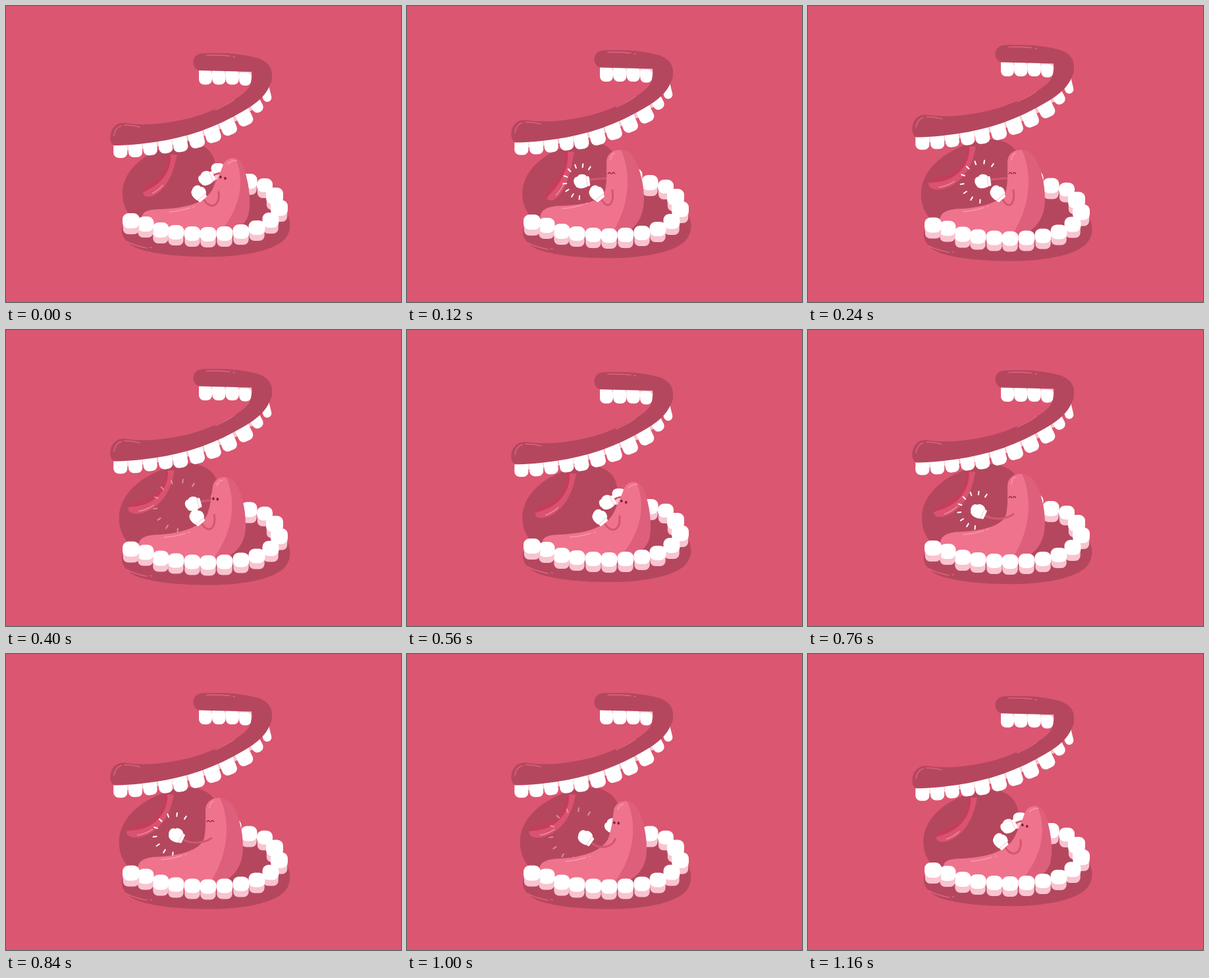
Animation, 600 px wide and 450 px high, one loop 1.2 s. Source, as an HTML page with a canvas:

```html
<!DOCTYPE html>
<html lang="en">
<head>
<meta charset="utf-8">
<title>Boxing tongue</title>
<style>
html, body { margin: 0; width: 100%; height: 100%; overflow: hidden; background: #db5671; }
canvas { display: block; width: 600px; height: 450px; }
</style>
</head>
<body>
<canvas id="stage"></canvas>
<script>
const canvas = document.getElementById('stage');
const g = canvas.getContext('2d');
const ratio = window.devicePixelRatio || 1;
canvas.width = 600 * ratio;
canvas.height = 450 * ratio;

const LOOP = 1200, HALF = 600, STEP = 40;
const BG = '#db5671', GUM = '#b4475e', SHINE = '#dc627d', WHITE = '#ffffff', BLUSH = '#f9c3d0';
const TONGUE = '#ef738d', SHADE = '#de5f7b', GLOW = '#f798ac', ARM = '#d4566f', EYE = '#7c2238';

// Each track is a list of [time, value] keys within half a loop.
const tracks = {
  upper: [[0, 0], [40, 5], [80, 6], [120, -4.5], [160, -10.5], [240, -12.5], [400, -12.5], [520, -10.3], [560, -7.7], [600, 0]],
  lower: [[0, 0], [40, -3.4], [80, -4.5], [120, 2], [160, 5], [240, 6.5], [400, 6.5], [520, 3.6], [560, 2], [600, 0]],
  lean: [[0, 0], [40, 0.5], [80, 0.97], [120, 1], [260, 1], [320, 0.9], [400, 0.6], [480, 0.2], [540, 0.02], [600, 0]],
  swing: [[0, 1.32], [40, 0.7], [80, 0], [120, 0.9], [160, 1.5], [240, 1.74], [400, 1.71], [520, 1.58], [560, 1.5], [600, 1.32]],
  reach: [[0, 79], [80, 72], [120, 82], [160, 92], [240, 97], [400, 96], [560, 90], [600, 79]],
  root: [[0, 252], [80, 246], [240, 247], [560, 249], [600, 252]]
};

const mix = (a, b, k) => a + (b - a) * k;
const mixAll = (a, b, k) => a.map((v, i) => mix(v, b[i], k));
const clamp = v => Math.max(0, Math.min(1, v));

function at(name, t) {
  const keys = tracks[name];
  let i = 1;
  while (i < keys.length - 1 && keys[i][0] < t) i++;
  const [t0, a] = keys[i - 1], [t1, b] = keys[i];
  return mix(a, b, (t - t0) / (t1 - t0));
}

function fill(path, color) {
  g.fillStyle = color;
  g.fill(path);
}

function stroke(path, color, width) {
  g.strokeStyle = color;
  g.lineWidth = width;
  g.stroke(path);
}

// Start point followed by cubic segments.
function cubic(p) {
  const path = new Path2D();
  path.moveTo(p[0], p[1]);
  for (let i = 2; i < p.length; i += 6) path.bezierCurveTo(...p.slice(i, i + 6));
  return path;
}

function box(x, y, w, h, r) {
  const path = new Path2D();
  path.roundRect(x, y, w, h, r);
  return path;
}

function place(x, y, deg, draw) {
  g.save();
  g.translate(x, y);
  g.rotate(deg * Math.PI / 180);
  draw();
  g.restore();
}

function shine(d, color, width = 1.6) {
  stroke(new Path2D(d), color, width);
}

/* ---- throat and uvula ---- */

const throat = new Path2D('M177 288C175 252 208 226 243 214C282 198 316 212 318 242C320 285 300 340 240 340C200 340 178 315 177 288Z');

function drawThroat(l) {
  const s = 1 + l * 0.011;
  g.save();
  g.translate(250, 270);
  g.scale(s, s);
  g.translate(-250, -270);
  fill(throat, GUM);
  g.restore();
}

function drawUvula(t, u) {
  const bend = at('swing', t), len = at('reach', t);
  let x = at('root', t), y = 226 + u;
  const n = 48, mid = [], left = [], right = [];
  for (let i = 0; i <= n; i++) {
    const s = i / n, a = bend * s;
    const w = (4 + 9 * Math.pow(s, 1.5) + 4 * Math.pow(1 - s, 6)) * Math.sqrt(1 - Math.pow(s, 7));
    const nx = Math.cos(a), ny = Math.sin(a);
    left.push([x - nx * w, y - ny * w]);
    right.push([x + nx * w, y + ny * w]);
    mid.push([x - nx * w * 0.25, y - ny * w * 0.25]);
    x -= Math.sin(a) * len / n;
    y += Math.cos(a) * len / n;
  }
  const outline = (a, b) => {
    const path = new Path2D();
    a.concat(b.slice().reverse()).forEach(p => path.lineTo(...p));
    path.closePath();
    return path;
  };
  fill(outline(left, right), '#c63c5b');
  fill(outline(mid, right), '#d95370');
  const hl = new Path2D();
  for (let i = 29; i < 41; i++) hl.lineTo(mix(mid[i][0], right[i][0], 0.68), mix(mid[i][1], right[i][1], 0.68));
  stroke(hl, '#f08ca2', 1.5);
}

/* ---- jaws ---- */

const lowerGum = new Path2D('M176 336C174 350 182 361 201 369C235 380 285 382 325 381C370 379 405 371 422 356C433 345 435 327 425 312C405 280 375 267 345 265C320 280 270 320 200 326Z');

// Left-to-right back row, then around the right side: centre x, top y, width, height.
const backTeeth = [
  [322, 239, 21, 25], [346, 245, 23, 30], [369, 255, 25, 32],
  [393, 262, 24, 30], [408, 276, 26, 34], [415, 295, 26, 33]
];
const frontTeeth = [
  [402, 314, 25, 32], [381, 326, 25, 31], [357, 332, 25, 31], [332, 335, 25, 31], [307, 336, 25, 31],
  [283, 335, 25, 31], [258, 333, 25, 31], [235, 329, 25, 32], [212, 320, 25, 32], [190, 315, 26, 32]
];

function lowerTooth([x, y, w, h]) {
  fill(box(x - w / 2 + 0.8, y + 7, w - 1.6, h - 7, 8), BLUSH);
  fill(box(x - w / 2, y, w, h - 9, 9), WHITE);
}

const upperGum = new Path2D('M298 72C330 70 365 73 385 80C400 86 405 96 404 108C404 113 403 116 401 120C395 136 381 148 360 160C320 184 275 200 225 207C205 210 180 212 164 212C157 208 157 196 161 188C165 181 172 177 181 178C215 183 260 178 300 164C330 152 361 138 370 122C373 115 374 108 373 100L293 98C281 94 281 73 298 72Z');

// Gum point, tilt, width, height.
const upperTeeth = [
  [174, 212, 1, 22, 19], [196, 210, -3, 22, 20], [218, 207, -6, 22, 20], [241, 203, -8, 22, 21],
  [263, 200, -10, 23, 22], [287, 193, -14, 24, 23], [311, 185, -17, 24, 23], [334, 174, -22, 24, 23],
  [358, 161, -26, 24, 22], [378, 146, -28, 18, 17], [394, 128, -14, 14, 18]
];

function upperTooth([x, y, tilt, w, h]) {
  place(x, y, tilt, () => fill(box(-w / 2 + 0.4, -9, w - 0.8, h + 9, [2, 2, 8, 8]), WHITE));
}

function drawUpper() {
  for (let i = 1; i < upperTeeth.length; i++) {
    const [x, y, tilt] = upperTeeth[i];
    const w = upperTeeth[i][3];
    place(x, y, tilt, () => fill(box(-w / 2 - 5, -6, 13, 15, 4), BLUSH));
  }
  upperTeeth.forEach(upperTooth);
  for (let i = 0; i < 4; i++) {
    const x = 293 + i * 20.4, w = i < 3 ? 20 : 18.5;
    fill(box(x + 3, 94, w, 16, 4), BLUSH);
    fill(box(x, 94, w - 2, 18, 2), i < 3 ? WHITE : BLUSH);
    fill(box(x, i < 3 ? 98 : 101, w, i < 3 ? 21.5 : 20, [2, 7, 8, 8]), WHITE);
  }
  fill(upperGum, GUM);
  shine('M164 197C165 189 169 184 175 182', SHINE);
  shine('M180 181C188 181 196 182 203 184', SHINE);
  shine('M305 75C317 74 329 75 340 76M345 77L347 77.4', SHINE);
  shine('M318 158C329 153 339 148 347 142', SHINE);
}

/* ---- the boxer ---- */

const bodyRest = [207, 322, 206, 312, 218, 309, 235, 309, 275, 307, 302, 300, 314, 278, 322, 262, 326, 252, 330, 241,
  336, 228, 354, 227, 360, 244, 368, 264, 372, 290, 369, 312, 367, 330, 350, 345, 325, 350];
const bodyLean = [204, 322, 202, 310, 211, 304, 228, 302, 270, 301, 296, 297, 301, 280, 304, 266, 303, 250, 303, 238,
  303, 216, 330, 213, 342, 228, 356, 248, 362, 280, 359, 304, 356, 326, 345, 340, 320, 352];
const shadeRest = [347, 228, 362, 258, 362, 305, 318, 352];
const shadeLean = [322, 213, 340, 245, 343, 302, 306, 354];

function drawTongue(p, l) {
  const pts = mixAll(bodyRest, bodyLean, p);
  for (let i = 0; i < 10; i += 2) {
    pts[i] -= l * 0.5;
    pts[i + 1] += l;
  }
  const body = cubic(pts);
  body.lineTo(230, 350);
  body.closePath();
  fill(body, TONGUE);

  g.save();
  g.clip(body);
  const side = cubic(mixAll(shadeRest, shadeLean, p));
  side.lineTo(400, 360);
  side.lineTo(400, 200);
  fill(side, SHADE);
  g.restore();

  const [x, y] = mixAll([248, 313], [236, 306], p);
  shine(`M${x} ${y + l}q16 -1 31 -6m5 -1.5l1.5 -.5`, GLOW);
  const [a, b, c, d] = mixAll([337, 240, 350, 235], [309, 234, 315, 224], p);
  shine(`M${a} ${b}Q${mix(a, c, 0.3)} ${d} ${c} ${d}`, GLOW, 1.5);
}

function drawEyes(p, happy) {
  const [ax, ay, bx, by] = mixAll([326, 260, 333, 262], [307.5, 254, 313.5, 254], p);
  for (const [x, y] of [[ax, ay], [bx, by]]) {
    if (happy) {
      shine(`M${x - 2.2} ${y + 1}Q${x} ${y - 2.6} ${x + 2.2} ${y + 1}`, EYE, 1.2);
    } else {
      fill(box(x - 1.7, y - 2.2, 3.4, 4.4, 1.7), EYE);
    }
  }
}

const fist = new Path2D('M8 -7C6 -12 -4 -13 -6 -8.5C-13 -9 -14 0 -11 4C-10 10 0 12 8 8Z');

function drawGlove(x, y, deg) {
  place(x, y, deg, () => {
    fill(fist, WHITE);
    fill(box(7, -7, 4.5, 15, 1.8), WHITE);
    shine('M7 -6.5L7 7.5', BLUSH, 1);
  });
}

function drawFar(p, q) {
  const [gx, gy] = mixAll([305, 262], [318, 260], p);
  const x = mix(gx, 266, q), y = mix(gy, 267, q);
  const sx = mix(330, 310, p), sy = mix(254, 261, p);
  shine(`M${sx} ${sy}Q${(sx + x) / 2} ${sy + 2 * q} ${x + 9} ${y - 3}`, ARM, 3);
  drawGlove(x, y, mix(-25, -8, q));
}

function drawNear(p, q) {
  const [sx, sy] = mixAll([323, 283], [312, 280], p);
  const x = mix(293 - 5 * p, 259, q), y = mix(285, 276, q);
  const arm = cubic([sx, sy, sx + 3 - 12 * q, sy + 20 - 13 * q, x + 18 + 6 * q, y + 26 - 12 * q, x + 8 + 2 * q, y + 10 - 4 * q]);
  stroke(arm, ARM, 3);
  drawGlove(x, y, mix(50, 25, q));
}

function drawRays(t, near) {
  if (t < 120 || t > 460) return;
  const r = mix(20, 35, clamp((t - 100) / 320)) + 1;
  const [x, y] = near ? [256, 274] : [264, 267];
  g.globalAlpha = 1 - 0.6 * clamp((t - 280) / 110) - 0.4 * clamp((t - 400) / 60);
  const rays = new Path2D();
  for (let i = 0; i < 9; i++) {
    const a = (95 + i * 26) * Math.PI / 180, c = Math.cos(a), s = Math.sin(a);
    rays.moveTo(x + c * r, y + s * r);
    rays.lineTo(x + c * (r + 5), y + s * (r + 5));
  }
  stroke(rays, WHITE, 2);
  g.globalAlpha = 1;
}

/* ---- scene ---- */

function shifted(dy, draw) {
  g.save();
  g.translate(0, dy);
  draw();
  g.restore();
}

function render(time) {
  const t = time % HALF, near = time >= HALF;
  const u = at('upper', t), l = at('lower', t), p = at('lean', t);

  g.setTransform(ratio, 0, 0, ratio, 0, 0);
  g.lineCap = g.lineJoin = 'round';
  g.fillStyle = BG;
  g.fillRect(0, 0, 600, 450);

  drawThroat(l);
  drawUvula(t, u);
  drawRays(t, near);
  shifted(l, () => {
    fill(lowerGum, GUM);
    shine('M183 358C193 363 204 366 214 368M219 367L221 367.4', SHINE);
    backTeeth.forEach(lowerTooth);
  });
  drawFar(p, near ? 0 : p);
  drawTongue(p, l);
  drawEyes(p, t >= 120 && t < 340);
  drawNear(p, near ? p : 0);
  shifted(l, () => frontTeeth.forEach(lowerTooth));
  shifted(u, drawUpper);
}

const start = performance.now();

function tick() {
  const time = (performance.now() - start) % LOOP;
  render(Math.floor(time / STEP) * STEP);
  requestAnimationFrame(tick);
}

tick();
</script>
</body>
</html>
```
